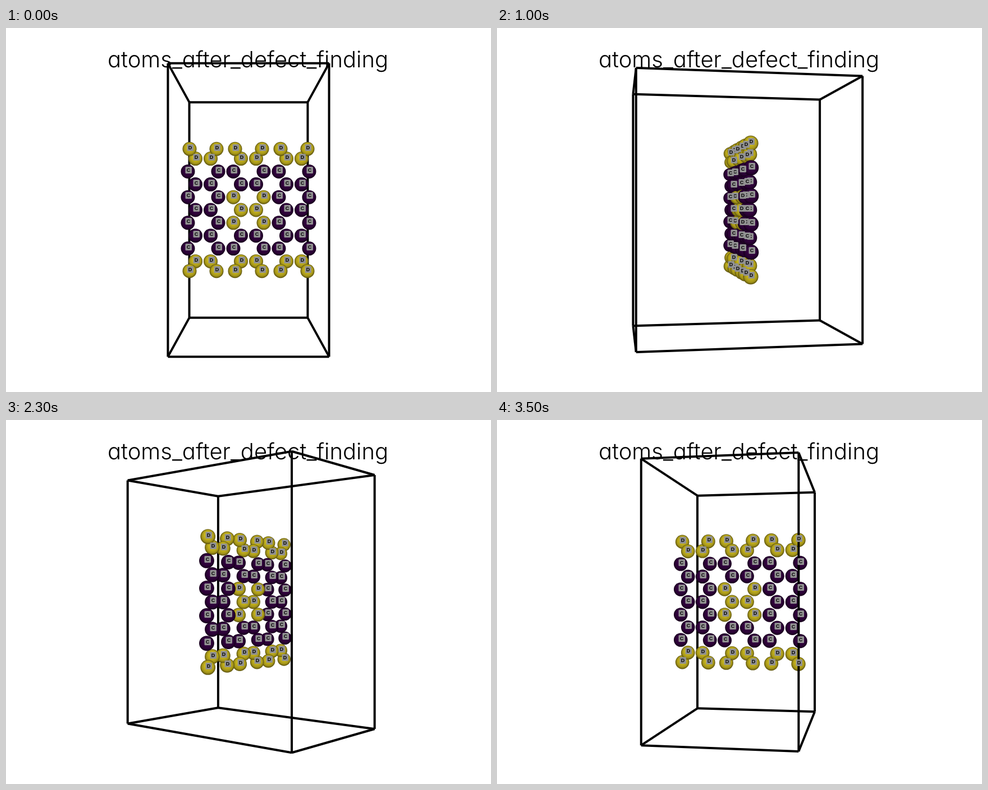
Recreate the animation shown at these times as an HTML page with a canvas. Size 864 px wide and 648 px high, loop 3.6 s.

```html
<!DOCTYPE html>
<html lang="en">
<head>
<meta charset="utf-8">
<title>Atoms</title>
<style>
  html, body { margin: 0; width: 864px; height: 648px; overflow: hidden; background: #fff; }
  canvas, svg { position: absolute; left: 0; top: 0; }
  text {
    font: 300 40px Inter, sans-serif;
    font-feature-settings: "cv11";
    font-optical-sizing: none;
    text-anchor: middle;
  }
</style>
</head>
<body>
<canvas id="scene" width="864" height="648"></canvas>
<svg width="864" height="648"><text x="431" y="70">atoms_after_defect_finding</text></svg>
<script>
const ctx = document.getElementById('scene').getContext('2d');
const CX = 432, CY = 324;
const DIST = 1209.2;            // camera distance in pixels at the centre plane
const BOX = [121.6, 221.2, 185]; // half sizes
const RADIUS = 12.5, CELL = 81, ROW = 22.85;
const STEP = 100, STEPS = 36;

// Slab of atoms: three cells, two atoms per cell in every row
function makeAtoms() {
  const atoms = [];
  const addRow = (k, y, half) => {
    for (const side of [-1, 1]) {
      for (const cell of [-1, 0, 1]) {
        const inner = cell === 0 && Math.abs(k) <= 1;
        atoms.push({
          x: cell * CELL + side * half, y, z: 0, row: k,
          inner, defect: inner || Math.abs(k) >= 4
        });
      }
    }
  };
  for (let k = -4; k <= 4; k++) addRow(k, k * ROW, k % 2 ? 27 : 13.5);
  addRow(-5, -108.7, 24);
  addRow(5, 108.7, 24);
  return atoms.sort((a, b) => a.defect - b.defect);
}

// Box corners are numbered by three sign bits; an edge flips one bit
function makeEdges() {
  const corner = i => {
    const [x, y, z] = BOX.map((half, bit) => (i >> bit & 1 ? half : -half));
    return { x, y, z };
  };
  const edges = [];
  for (let i = 0; i < 8; i++) {
    for (const bit of [1, 2, 4]) {
      if (!(i & bit)) edges.push([corner(i), corner(i | bit)]);
    }
  }
  return edges;
}

function shade(stops) {
  const g = ctx.createRadialGradient(0.06, -0.45, 0, 0, 0, 1);
  stops.forEach(([at, color]) => g.addColorStop(at, color));
  return g;
}

const atoms = makeAtoms();
const edges = makeEdges();
const yellow = shade([[0, '#dfcb20'], [0.45, '#cbb81d'], [0.8, '#a39419'], [1, '#5a510d']]);
const purple = shade([[0, '#3e034c'], [0.45, '#350242'], [0.8, '#290133'], [1, '#150019']]);

function project(p, angle) {
  const c = Math.cos(angle), s = Math.sin(angle);
  const z = p.z * c - p.x * s;
  const scale = DIST / (DIST - z);
  return { x: CX + (p.x * c + p.z * s) * scale, y: CY + p.y * scale, z, scale };
}

function drawEdge([a, b]) {
  ctx.beginPath();
  ctx.moveTo(a.x, a.y);
  ctx.lineTo(b.x, b.y);
  ctx.stroke();
}

function drawSphere({ x, y, scale, defect }) {
  ctx.save();
  ctx.translate(x, y);
  ctx.scale(RADIUS * scale, RADIUS * scale);
  ctx.fillStyle = defect ? yellow : purple;
  ctx.beginPath();
  ctx.arc(0, 0, 1, 0, 2 * Math.PI);
  ctx.fill();
  ctx.restore();
}

function drawLabel({ x, y, defect }) {
  const lx = Math.round(x + 1.3), ly = Math.round(y - 2.7);
  ctx.fillStyle = '#919191';
  ctx.beginPath();
  ctx.roundRect(lx - 5.5, ly - 6, 11.5, 12, 1.5);
  ctx.fill();
  ctx.fillStyle = '#000';
  ctx.fillText(defect ? 'D' : 'C', lx, ly + 3);
}

// A label is left out when it almost coincides with one already placed
function drawLabels(spots) {
  const placed = [];
  for (const s of spots) {
    const gap = s.inner ? 4.8 : 5.2;
    if (placed.some(p => p.row === s.row && Math.abs(p.x - s.x) < gap)) continue;
    placed.push(s);
    drawLabel(s);
  }
}

function draw(angle) {
  ctx.fillStyle = '#fff';
  ctx.fillRect(0, 0, 864, 648);
  ctx.strokeStyle = '#000';
  ctx.lineWidth = 4;
  ctx.font = 'bold 9px "Liberation Sans", Arial, sans-serif';
  ctx.textAlign = 'center';

  const lines = edges.map(e => e.map(p => project(p, angle)));
  const isFront = ([a, b]) => a.z + b.z > 0;
  const spots = atoms.map(a => ({ ...a, ...project(a, angle) }));

  lines.filter(l => !isFront(l)).forEach(drawEdge);
  [...spots].sort((a, b) => a.z - b.z).forEach(drawSphere);
  lines.filter(isFront).forEach(drawEdge);
  drawLabels(spots);
}

function tick() {
  const step = Math.floor(performance.now() / STEP) % STEPS;
  draw(step * 2 * Math.PI / STEPS);
  requestAnimationFrame(tick);
}
tick();
</script>
</body>
</html>
```
